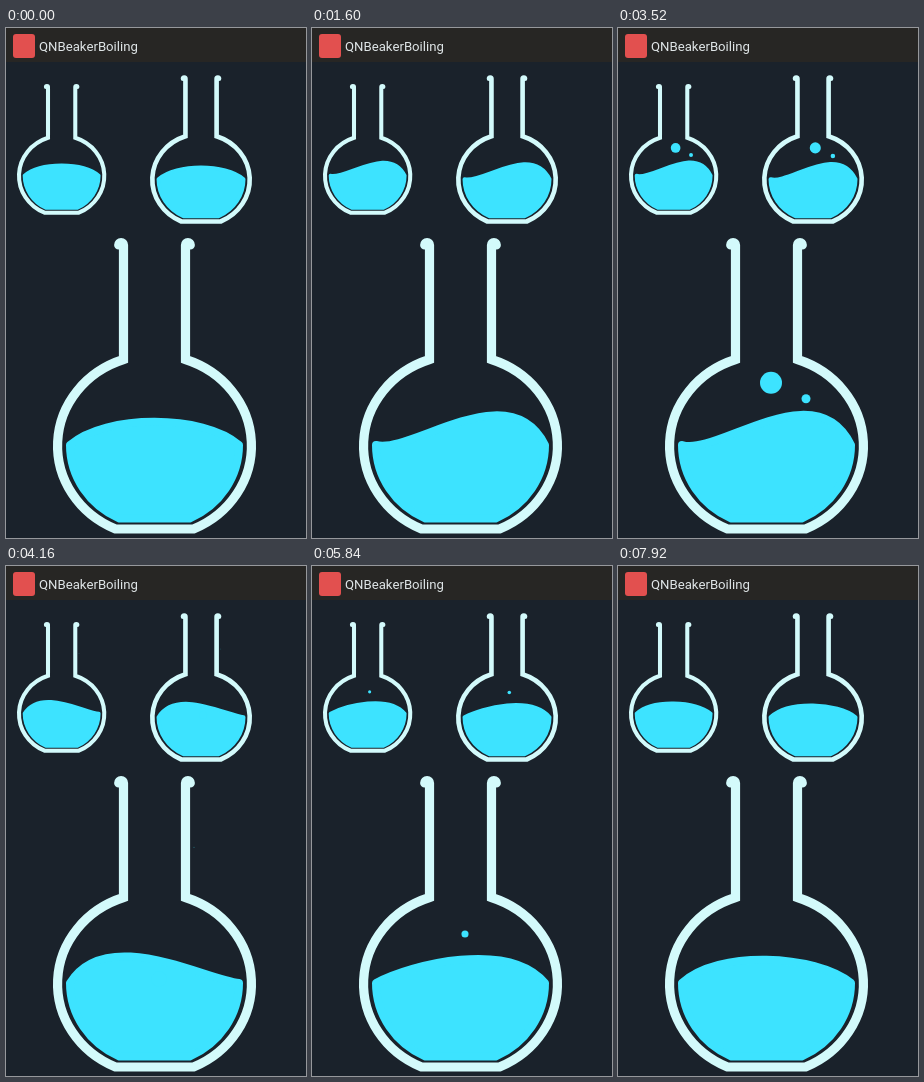
Animation of 300x510 px, one loop 8000 ms. Source, as an HTML page:

```html
<!DOCTYPE html>
<html lang="en">
<head>
<meta charset="utf-8">
<title>Flasks</title>
<style>
  html, body { margin: 0; width: 100%; height: 100%; overflow: hidden; background: #1a222b; }
  svg { display: block; width: 300px; height: 510px; }
  .glass { fill: none; stroke: #d3fafb; stroke-width: 9.2; stroke-linecap: round; }
  .water { fill: #3de3ff; }
  #liquid { stroke: #3de3ff; stroke-width: 8; stroke-linejoin: round; }
  text { font: 13.2px Roboto, Arial, sans-serif; fill: #dfe5e7; }
</style>
</head>
<body>
<svg viewBox="0 0 300 510">
  <defs>
    <g id="flask">
      <g class="water">
        <path id="liquid"/>
        <g id="bubbles"></g>
      </g>
      <path class="glass" d="M112.700 217A2.400 2.400 0 0 1 117.500 217V331.500A97 91 0 0 0 109.500 501H187.500A97 91 0 0 0 179.500 331.500V217A2.400 2.400 0 0 1 184.300 217"/>
    </g>
  </defs>
  <rect width="300" height="510" fill="#1a222b"/>
  <rect width="300" height="34" fill="#272624"/>
  <rect x="7" y="6" width="22" height="24" rx="3" fill="#e2504f"/>
  <text x="33" y="22.500">QNBeakerBoiling</text>
  <use href="#flask" transform="translate(-9.700 -37) scale(.44 .4426)"/>
  <use href="#flask" transform="translate(120.400 -58.500) scale(.5025 .503)"/>
  <use href="#flask"/>
</svg>
<script>
const LOOP = 8000, SWAY = 988;               // ms; SWAY is half a swing
const LIFE = 1000, DEPTH = 415, RISE = 140;  // one bubble's climb

// Bubbles: start in ms, x, first radius
const bubbles = [
  [3090, 153, 13.5], [3205, 188, 5],
  [4145, 153, 7.6], [4585, 153, 1.8], [4645, 109, 6.9],
  [5505, 153, 4], [6760, 153, 6], [6880, 153, 5]
].map(([start, x, size]) => {
  const el = document.createElementNS('http://www.w3.org/2000/svg', 'circle');
  el.setAttribute('cx', x);
  document.getElementById('bubbles').append(el);
  return { el, start, size };
});

const liquid = document.getElementById('liquid');

function draw(t) {
  const tilt = -43 * Math.sin(Math.PI * t / SWAY);
  liquid.setAttribute('d',
    `M64 417C100 ${386 + tilt} 197 ${386 - tilt} 233 417` +
    'A84.5 80.7 0 0 1 183.5 490.5H113.5A84.5 80.7 0 0 1 64 417Z');

  for (const { el, start, size } of bubbles) {
    const p = (t - start) / LIFE;
    el.setAttribute('cy', DEPTH - RISE * p);
    el.setAttribute('r', p > 0 && p < 1 ? size * (1 - p * p) : 0);
  }
}

const begin = performance.now();
function tick() {
  draw((performance.now() - begin) % LOOP);
  requestAnimationFrame(tick);
}
tick();
</script>
</body>
</html>
```
